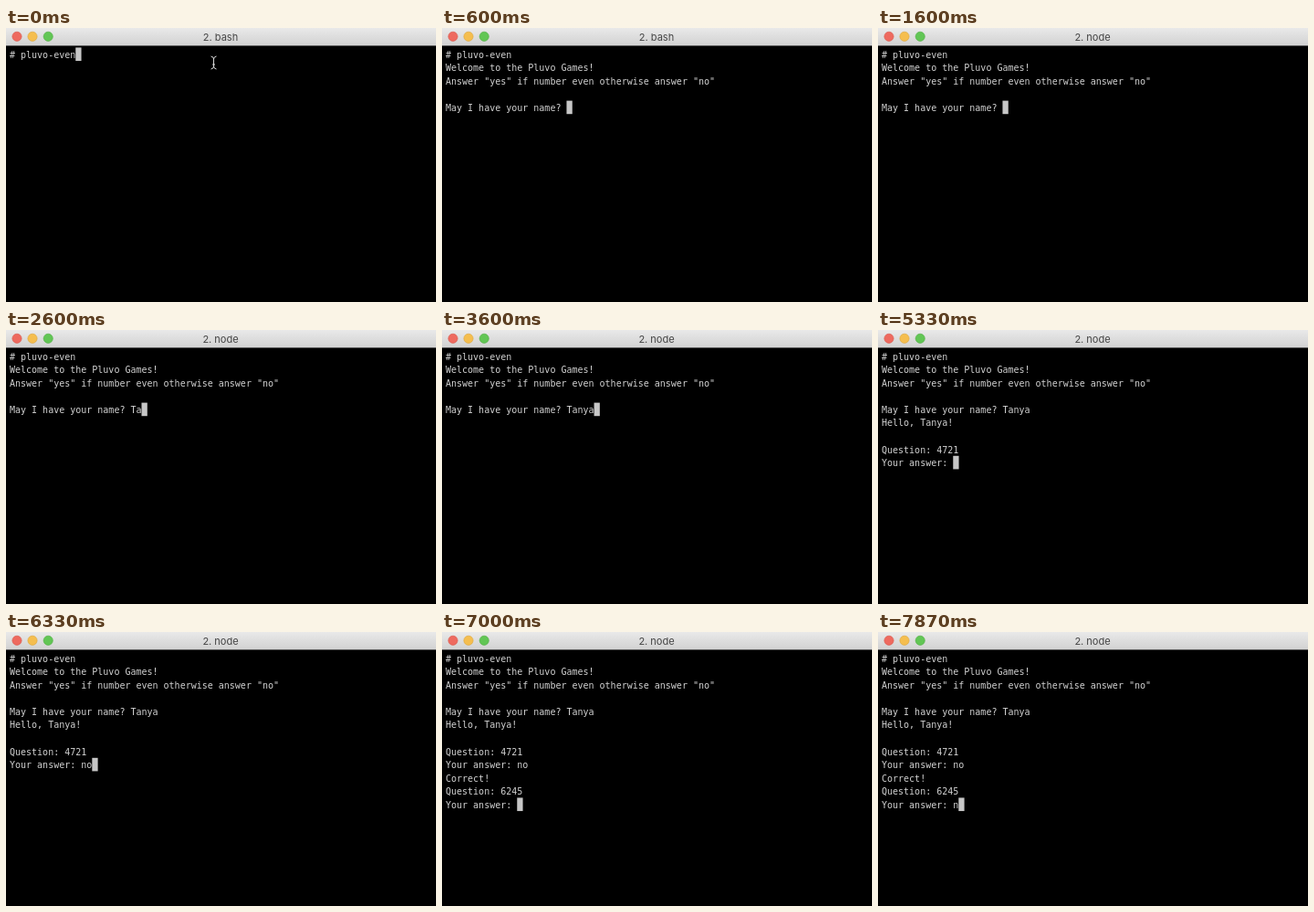
These frames come from a looping animation (471x300 px, 8 s). An HTML page with a canvas:

```html
<!DOCTYPE html>
<html lang="en">
<head>
<meta charset="utf-8">
<title>Terminal</title>
<style>
html, body { margin: 0; width: 100%; height: 100%; overflow: hidden; background: #000; }
canvas { display: block; width: 471px; height: 300px; }
</style>
</head>
<body>
<canvas id="stage" width="471" height="300"></canvas>
<script>
const ctx = document.getElementById('stage').getContext('2d');
const LOOP = 8000;
const LEFT = 4, COL = 6.02, ROW = 14.55, TOP = 21.4;

// Each event appends output or a typed key to the screen.
const events = [
  [0, '# pluvo-even'],
  [330, '\n'],
  [530, 'Welcome to the Pluvo Games!\nAnswer "yes" if number even otherwise answer "no"\n\nMay I have your name? '],
  [2270, 'T'], [2470, 'a'], [2800, 'n'], [3130, 'y'], [3330, 'a'],
  [4000, '\n'],
  [4070, 'Hello, Tanya!\n\nQuestion: 4721\nYour answer: '],
  [5870, 'n'], [6070, 'o'],
  [6400, '\n'],
  [6470, 'Correct!\nQuestion: 6245\nYour answer: '],
  [7870, 'n']
];

function dot(x, fill, rim) {
  ctx.beginPath();
  ctx.arc(x, 9.3, 5.1, 0, Math.PI * 2);
  ctx.fillStyle = fill;
  ctx.fill();
  ctx.strokeStyle = rim;
  ctx.lineWidth = 0.6;
  ctx.stroke();
}

function titleBar(label) {
  const shade = ctx.createLinearGradient(0, 0, 0, 19);
  shade.addColorStop(0, '#e9e9e9');
  shade.addColorStop(1, '#d2d2d2');
  ctx.fillStyle = shade;
  ctx.fillRect(0, 0, 471, 19);
  ctx.fillStyle = '#8c8c8c';
  ctx.fillRect(0, 19, 471, 0.6);
  dot(12, '#ee6a5f', '#d9564b');
  dot(29, '#f5be4f', '#dca43a');
  dot(46.2, '#62c655', '#50ab42');
  ctx.font = '11px Inter, "Open Sans", sans-serif';
  ctx.textAlign = 'center';
  ctx.fillStyle = '#444';
  ctx.fillText(label, 235, 13.6);
}

function pointer(x, y) {
  ctx.beginPath();
  for (const s of [-1, 1]) {
    ctx.moveTo(x - 3, y + s * 7);
    ctx.quadraticCurveTo(x, y + s * 6.5, x, y + s * 4);
    ctx.quadraticCurveTo(x, y + s * 6.5, x + 3, y + s * 7);
  }
  ctx.moveTo(x, y - 5);
  ctx.lineTo(x, y + 5);
  ctx.moveTo(x - 1.5, y + 2);
  ctx.lineTo(x + 1.5, y + 2);
  ctx.strokeStyle = '#d8d8d8';
  ctx.lineWidth = 1;
  ctx.stroke();
}

function terminal(t) {
  const lines = events.filter(e => e[0] <= t).map(e => e[1]).join('').split('\n');
  ctx.font = '10px "DejaVu Sans Mono", monospace';
  ctx.textAlign = 'left';
  ctx.fillStyle = '#d2d2d2';
  lines.forEach((line, i) => ctx.fillText(line, LEFT, TOP + 11.3 + i * ROW));
  const row = lines.length - 1;
  ctx.fillStyle = '#c7c7c7';
  ctx.fillRect(LEFT + lines[row].length * COL, TOP + row * ROW, 6.3, 14.6);
}

function draw(now) {
  const t = now % LOOP;
  ctx.fillStyle = '#000';
  ctx.fillRect(0, 0, 471, 300);
  titleBar(t < 670 ? '2. bash' : '2. node');
  terminal(t);
  if (t < 330) pointer(227.5, 38);
}

const start = performance.now();
function tick() {
  draw(performance.now() - start);
  requestAnimationFrame(tick);
}
tick();
</script>
</body>
</html>
```
